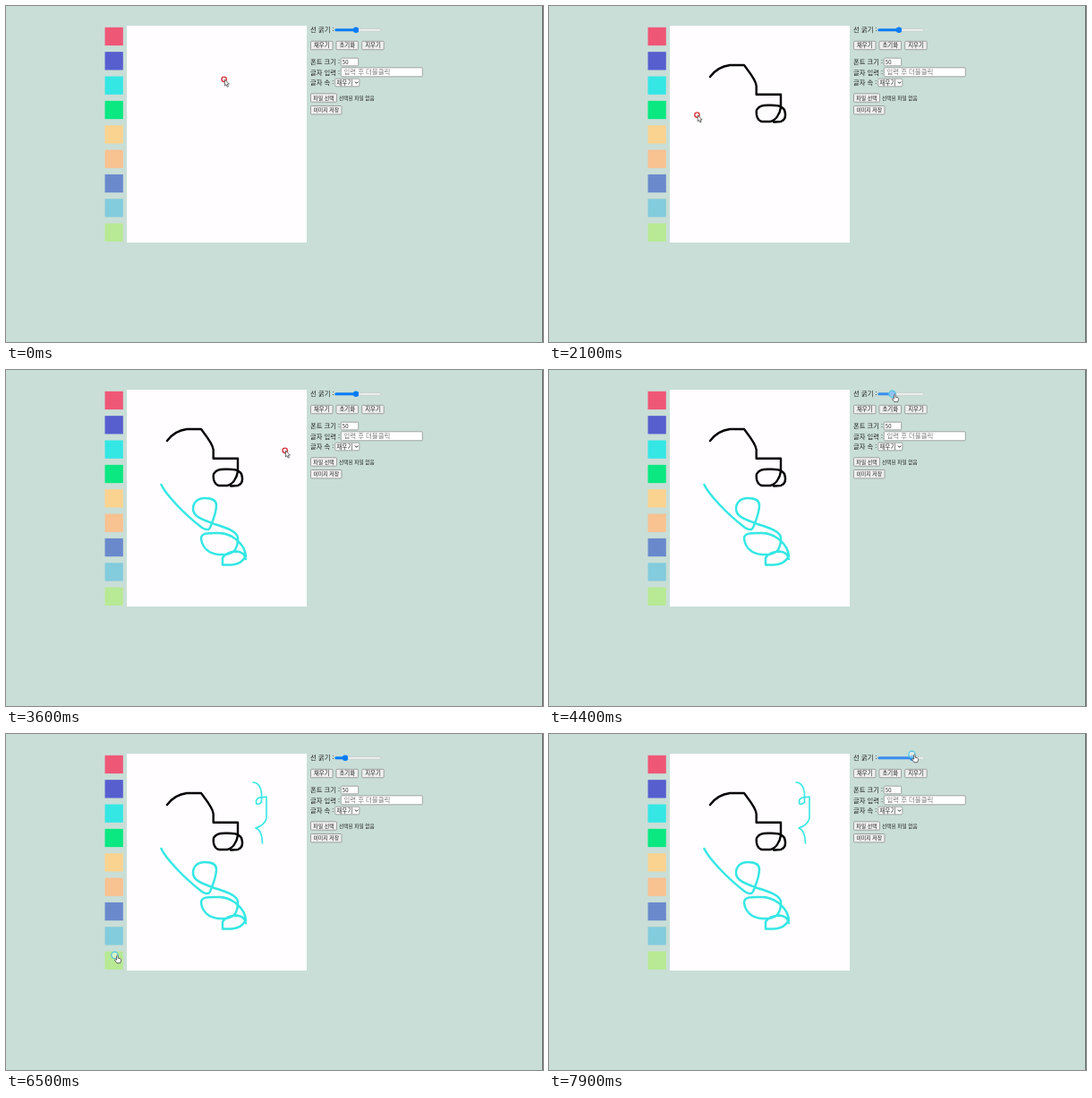
An HTML page for the animation above (8000 ms loop, 600 by 375 pixels).

```html
<!DOCTYPE html>
<html lang="ko">
<head>
<meta charset="utf-8">
<style>
html, body { margin: 0; width: 100%; height: 100%; overflow: hidden; background: #c9ded7; }
svg { display: block; width: 600px; height: 375px; font-family: "Noto Sans CJK KR", "Noto Sans CJK", "Noto Sans CJK JP", sans-serif; }
</style>
</head>
<body>
<svg viewBox="0 0 600 375">
  <rect x="135" y="22" width="201" height="242" fill="#fffdff"/>
  <rect x="599" width="1" height="375" fill="#000" opacity=".5"/>
  <g id="swatches"></g>
  <g id="controls"></g>
  <rect x="367.5" y="25.4" width="51.5" height="2.8" rx="1.4" fill="#efefef" stroke="#b5bdba" stroke-width=".5"/>
  <rect id="fill" x="367.3" y="25.2" height="3.1" rx="1.5"/>
  <circle id="thumb" cy="26.8" r="3.2"/>
  <g id="ink" fill="none" stroke-linecap="round" stroke-linejoin="round"></g>
  <circle id="ring" fill="#fff" fill-opacity=".45"/>
  <g id="pointer" fill="#fff" stroke="#333" stroke-width=".7" stroke-linejoin="round">
    <path id="arrow" d="M0 0V7L1.6 5.6L2.8 8.2L4 7.6L2.9 5.1H5Z"/>
    <path id="hand" d="M-.8 .6Q0 -.6 .8 .6V3.2L3.6 3.8Q4.4 4.2 4.2 5.4L3.4 8.6H-.6L-3 5.2Q-2.6 4 -.8 5.2Z"/>
  </g>
</svg>
<script>
const LOOP = 8000;
const $ = id => document.getElementById(id);

function add(parent, tag, attrs, text = '') {
  const el = document.createElementNS('http://www.w3.org/2000/svg', tag);
  for (const k in attrs) el.setAttribute(k, attrs[k]);
  el.textContent = text;
  return $(parent).appendChild(el);
}
const set = (id, attrs) => {
  for (const k in attrs) $(id).setAttribute(k, attrs[k]);
};

['#ef5777', '#575fcf', '#34e7e4', '#0be881', '#fad390', '#f8c291', '#6a89cc', '#82ccdd', '#b8e994']
  .forEach((fill, i) => add('swatches', 'rect', { x: 110.5, y: 23.8 + i * 27.35, width: 20.3, height: 20.3, fill }));

const label = (x, y, size, text, fill = '#222') =>
  add('controls', 'text', { x, y, 'font-size': size, fill }, text);
const box = (x, y, width, height, fill, stroke = '#858585') =>
  add('controls', 'rect', { x, y, width, height, rx: 1, fill, stroke, 'stroke-width': .7 });
function button(x, y, w, size, text) {
  box(x, y, w, 9.4, '#efefef');
  label(x + w / 2, y + 6.9, size, text).setAttribute('text-anchor', 'middle');
}

label(340, 29.4, 7.4, '선 굵기 :');
button(340.5, 39.3, 24.5, 6.4, '채우기');
button(369, 39.3, 24.5, 6.4, '초기화');
button(397.7, 39.3, 24.5, 6.4, '지우기');
label(340, 64.6, 7.3, '폰트 크기 :');
box(374.3, 58.2, 19.4, 8.6, '#fff');
label(375.8, 64.7, 6, '50');
label(340, 76.6, 7.3, '글자 입력 :');
box(374.3, 68.8, 91, 10, '#fff');
label(377.5, 76.2, 7.4, '입력 후 더블클릭', '#777');
label(340, 87.9, 7.3, '글자 속 :');
box(367.8, 81.2, 27, 8.6, '#fff');
label(369.3, 87.7, 6.6, '채우기');
add('controls', 'path', { d: 'M390 84.6l1.6 1.7l1.6-1.7', fill: 'none', stroke: '#222' });
button(340.5, 97.8, 29, 5.9, '파일 선택');
label(372, 104.7, 5.7, '선택된 파일 없음');
button(340.5, 111.5, 34.5, 5.9, '이미지 저장');

// Pen strokes: start, end, colour, width, path
const strokes = [
  [390, 1200, '#000', 2.4, 'M180 79C186 71 194 67 202 66H218C224 74 231 82 231.7 89V98.7H259V113C258 121 253 128 247 129H238C233 128 231 122 232 116C235 111 239 111 245 110.8C254 110.5 260 111 263 116'],
  [1200, 1400, '#000', 2.4, 'M263 116C265 122 264 127 259 129L251 129.5'],
  [2150, 2800, '#34e7e4', 2.5, 'M173.5 128C178 138 198 160 219 176Q226 180 228 176C231 168 235 160 235 151C235 145 230 143 222 143C214 143 209 148 209 155C209 164 220 167 233 172C246 176 258 180 259 187C259.5 194 258 198 255 202'],
  [2800, 3400, '#34e7e4', 2.5, 'M255 202C250 206 246 206 238 206C226 205 219 198 218 188C218 181 228 182 238 182C252 182 267 194 268 208C264 214 260 217 251 217.5H242V209.5C246 204 252 202.5 258 202.5C263 203 267 206 268 211'],
  [4950, 5300, '#34e7e4', 1.6, 'M276 54C282 54 285 60 285.5 66V76'],
  [5300, 5950, '#34e7e4', 1.6, 'M285.5 76Q283 79 280 78Q278 73 283 71L291 70V94Q289 102 279 105Q286 107 286.5 122']
].map(([from, to, stroke, width, d]) => {
  const path = add('ink', 'path', { d, stroke, 'stroke-width': width });
  return { from, to, path, len: path.getTotalLength() };
});

// Pointer moves between strokes: time, x, y
const moves = [
  [0, 244, 82], [100, 244, 82], [390, 180, 79], [1400, 251, 129.5], [1780, 126, 85], [1950, 122, 87],
  [2150, 173.5, 128], [3400, 268, 211], [3600, 312, 90], [3900, 393, 27], [4050, 393, 27],
  [4400, 386, 27], [4600, 381, 27], [4700, 381, 27], [4950, 276, 54], [5950, 286.5, 122],
  [6300, 124, 247], [6650, 124, 247], [7200, 372, 40], [7450, 381, 25], [7900, 408, 23], [LOOP, 408, 23]
];
const presses = [[1850, 1980], [4050, 4650], [6400, 6650], [7450, LOOP]];

function pointerAt(t) {
  const s = strokes.find(s => t >= s.from && t < s.to);
  if (s) return s.path.getPointAtLength(s.len * (t - s.from) / (s.to - s.from));
  const i = moves.findIndex(m => m[0] > t);
  const [t0, x0, y0] = moves[i - 1], [t1, x1, y1] = moves[i];
  let p = (t - t0) / (t1 - t0);
  p *= p * (3 - 2 * p);
  return { x: x0 + (x1 - x0) * p, y: y0 + (y1 - y0) * p };
}

function thumbAt(t) {
  if (t < 4050) return 391;
  if (t < 4600 || t >= 7450) return pointerAt(t).x - 2;
  return 379;
}

function draw(t) {
  for (const { from, to, path, len } of strokes) {
    const p = Math.min(1, (t - from) / (to - from));
    path.style.display = p > 0 ? '' : 'none';
    path.setAttribute('stroke-dasharray', p < 1 ? `${Math.max(0, p) * len} ${len + 9}` : 'none');
  }

  const { x, y } = pointerAt(t);
  const onSlider = y < 32 && x > 365 && x < 421;
  const hand = onSlider || x < 131;
  const pressed = presses.some(([a, b]) => t >= a && t < b);
  const down = pressed || strokes.some(s => t >= s.from && t < s.to);

  const thumb = thumbAt(t);
  const blue = onSlider ? (pressed ? '#378fee' : '#005cc8') : '#0a7cf5';
  set('fill', { width: thumb - 367.3, fill: blue });
  set('thumb', { cx: thumb, fill: blue });

  set('ring', {
    cx: hand ? x - 2.5 : x - .3, cy: y - .2, r: down ? 3.7 : 2.7,
    stroke: down ? '#4cc4e6' : '#d8343c', 'stroke-width': down ? 1.2 : 1.4
  });
  set('pointer', { transform: `translate(${x + .4} ${y})` });
  $('arrow').style.display = hand ? 'none' : '';
  $('hand').style.display = hand ? '' : 'none';
}

const start = performance.now();
function tick() {
  draw((performance.now() - start) % LOOP);
  requestAnimationFrame(tick);
}
tick();
</script>
</body>
</html>
```
